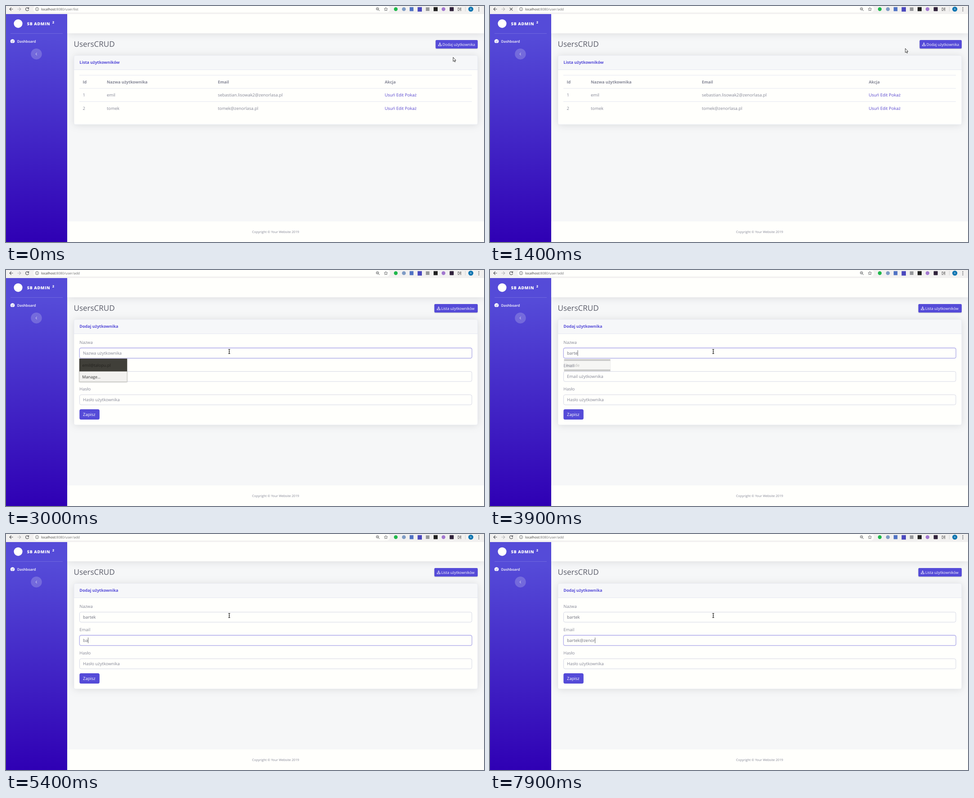
These frames come from a looping animation (1062x527 px, 8 s). An HTML page:

```html
<!DOCTYPE html>
<html lang="pl">
<head>
<meta charset="utf-8">
<title>UsersCRUD</title>
<style>
html, body { margin: 0; width: 100%; height: 100%; overflow: hidden; background: #f6f7f8; }
svg { display: block; width: 1062px; height: 527px; font: 9.45px "Open Sans", "Noto Sans", sans-serif; text-rendering: geometricPrecision; fill: #858796; }
text { white-space: pre; }
.white { fill: #fffffc; }
.line { stroke: #e3e6f0; fill: none; }
.shadow { filter: drop-shadow(0 1.5px 8.5px rgba(58, 59, 69, .15)); }
.primary { fill: #554bd8; }
.title { fill: #554bd8; font-weight: 700; font-size: 9.04px; }
.head { font-weight: 700; font-size: 9.04px; }
.link { fill: #5846cf; }
.small { font-size: 8.25px; }
.url { font-size: 7.6px; }
.popup { font-size: 9px; fill: #333; }
.icon { fill: none; stroke: #505256; stroke-width: 1.2; }
</style>
</head>
<body>
<svg viewBox="0 0 1062 527">
  <defs>
    <linearGradient id="side" x1="0" y1="0" x2="0" y2="1">
      <stop offset=".1" stop-color="#554bd8"/>
      <stop offset="1" stop-color="#2f00b4"/>
    </linearGradient>
    <path id="download" d="M3 0h2v3h2L4 6 1 3h2zM0 5h1.5L4 7.2 6.5 5H8v3H0z" fill="#c3bff2"/>
  </defs>

  <rect width="1062" height="527" fill="#f6f7f8"/>
  <rect class="white shadow" x="136" y="18" width="926" height="43"/>
  <rect class="white" x="136" y="481" width="926" height="46"/>
  <text x="599" y="506.5" text-anchor="middle" font-size="7.2">Copyright © Your Website 2019</text>
  <text x="150.5" y="91" font-size="17" fill="#5a5c69">UsersCRUD</text>

  <g id="list"></g>
  <g id="form"></g>

  <rect y="18" width="136" height="509" fill="url(#side)"/>
  <g class="white">
    <circle cx="27" cy="39.3" r="9.6"/>
    <text x="46.8" y="43" font-size="9.1" font-weight="800" letter-spacing=".6">SB ADMIN</text>
    <text x="103" y="39.2" font-size="7" font-weight="800">2</text>
    <path d="M10 61.5h116" stroke="#fff" stroke-opacity=".16"/>
    <path d="M11.5 82.6a4.8 4.8 0 1 1 6 0z"/>
    <path d="M14.5 81l2-4.5M11.4 79.5h1M12.5 76.8l.6.6" stroke="#554bd8" stroke-width=".9"/>
    <text x="24.8" y="82" font-size="7.9" font-weight="600">Dashboard</text>
    <circle cx="67.5" cy="107.2" r="12.2" fill-opacity=".2"/>
    <path d="M68.7 104.5l-2.5 2.7 2.5 2.7" fill="none" stroke="#fff" stroke-opacity=".6" stroke-width="1.1"/>
  </g>

  <rect width="1062" height="18" fill="#f2f1f0"/>
  <rect class="white" x="61" y="-1" width="792" height="15.5" rx="7.5"/>
  <g class="icon">
    <path d="M15.5 7h-7M11.7 3.4L8.1 7l3.6 3.6"/>
    <path d="M25.5 7h7M29.3 3.4L32.900 7l-3.600 3.600" stroke="#b4b5b7"/>
    <path id="reload" d="M49.800 4.900a3.500 3.500 0 1 0 .700 2.900M50.500 3v2.700h-2.700"/>
    <path id="stop" d="M43.800 3.800l6.400 6.400M50.200 3.800l-6.400 6.400"/>
    <path d="M69 6.500v2.700M69 4.600v1" stroke-width=".9"/>
    <circle cx="69" cy="7" r="3.700" stroke-width=".8"/>
    <circle cx="825.300" cy="6.300" r="2.700" stroke-width="1"/>
    <path d="M827.300 8.300l2.700 2.700M824 6.300h2.600" stroke-width="1"/>
    <path d="M844 3.300l1.100 2.500 2.700.300-2 1.800.600 2.700-2.400-1.400-2.400 1.400.600-2.700-2-1.800 2.700-.300z" stroke-width=".8"/>
    <path d="M1003.500 4.500h3.500m1.500 0h3M1003.500 7.200h1.500m1.500 0h5M1003.500 10h4m1.500 0h2.500" stroke="#333"/>
    <path d="M1020.500 2v10" stroke="#d2d2d2" stroke-width="1"/>
  </g>
  <circle cx="866" cy="7" r="4.200" fill="#20b84c"/>
  <circle cx="884" cy="7" r="4.300" fill="#7f9cc5"/>
  <rect x="896.800" y="2.500" width="8.500" height="9" fill="#4f72c4"/>
  <rect x="914.500" y="2.500" width="9.500" height="10" fill="#4a48bd"/>
  <rect x="932.800" y="3" width="8" height="8" fill="#96989b"/>
  <rect x="950" y="2.500" width="9" height="9" fill="#202020"/>
  <circle cx="972" cy="7" r="4.200" fill="#a278cf"/>
  <rect x="985.700" y="2.500" width="9" height="9" rx="1" fill="#30223b"/>
  <circle cx="1032.700" cy="7" r="5.600" fill="#0b74b0"/>
  <text x="1032.700" y="9.200" text-anchor="middle" font-size="6" fill="#fff">A</text>
  <g fill="#505256"><circle cx="1050.500" cy="3.700" r="1"/><circle cx="1050.500" cy="7.200" r="1"/><circle cx="1050.500" cy="10.700" r="1"/></g>
  <text class="url" x="78" y="9.800"><tspan fill="#333">localhost</tspan><tspan id="path" fill="#707174"></tspan></text>

  <g id="status">
    <path d="M-1 515.500h97q2 0 2 2v11h-99z" fill="#f2f1f0" stroke="#c4c4c4" stroke-width=".8"/>
    <text x="1.800" y="524.300" font-size="8.200" fill="#555">localhost:8080/user/add</text>
  </g>

  <g id="menu" class="popup">
    <rect x="163" y="198" width="106" height="51.500" fill="#f2f1ef" stroke="#b9b8b4" stroke-width=".8" style="filter:drop-shadow(0 1px 1px #0003)"/>
    <rect x="163" y="198" width="106" height="28.500" fill="#403f39"/>
    <text x="169.300" y="215.500" fill="#22211e">emil@talopu.pl</text>
    <text x="169.300" y="241.500">Manage…</text>
  </g>
  <g id="hint" class="popup">
    <rect x="163" y="198" width="106" height="29" fill="#f2f1ef" stroke="#b9b8b4" stroke-width=".8"/>
    <text x="169.300" y="215.500">barsde</text>
  </g>

  <path id="arrow" d="M.4.500v9.300l2.100-1.900 1.500 3.100 1.300-.600-1.400-3h2.700z" fill="#fff" stroke="#222" stroke-width=".9"/>
  <path id="beam" d="M-2-4.700h1.300l.700.500.700-.500H2M0-4.200v8.400M-2 4.700h1.300l.700-.500.700.500H2M-1 0h2" fill="none" stroke="#222" stroke-width="1.200"/>
</svg>

<script>
const $ = id => document.getElementById(id);
const show = (id, on) => $(id).style.display = on ? '' : 'none';
const text = (x, y, s, cls = '') => `<text x="${x}" y="${y}" class="${cls}">${s}</text>`;

const card = (bottom, title) => `
  <rect class="white shadow" x="151" y="110.500" width="897" height="${bottom - 110.5}" rx="3.500"/>
  <path d="M151 142v-28q0-3.500 3.500-3.500h890q3.500 0 3.500 3.500v28z" fill="#f6f7f9"/>
  <path class="line" d="M151 142.300h897"/>
  <rect class="line" x="151" y="110.500" width="897" height="${bottom - 110.5}" rx="3.500" stroke-width=".6"/>
  ${text(163.3, 129, title, 'title')}`;

const button = (x, label, id) => `
  <rect id="${id}" class="primary" x="${x}" y="76" width="${1048 - x}" height="19" rx="2.200" style="filter:drop-shadow(0 1px 1px #0003)"/>
  <use href="#download" x="${x + 5.5}" y="81.500"/>
  ${text(x + 15.3, 88.7, label, 'white small')}`;

const row = (y, cells, cls) => [170.5, 224, 470.7, 841.5]
  .map((x, i) => text(x, y, cells[i], cls || (i == 3 ? 'link' : ''))).join('');

const field = (i, label) => {
  const y = 174 + 52.1 * i;
  return `${text(163.3, y - 9, label)}
  <rect id="glow${i}" x="162.500" y="${y - 1}" width="873.500" height="25" rx="4.500" fill="#d4d1f5"/>
  <rect class="white" x="163.500" y="${y + .4}" width="871.500" height="22.500" rx="3.500" stroke="#d1d3e2" stroke-width=".9"/>
  <rect id="ring${i}" x="163.300" y="${y + .3}" width="872" height="22.600" rx="3.500" fill="none" stroke="#aaa4ec" stroke-width=".9"/>
  <text id="value${i}" x="171" y="${y + 15}"></text>
  <rect id="caret${i}" y="${y + 5.2}" width=".9" height="12.500" fill="#55565f"/>`;
};

const actions = 'Usuń Edit Pokaż';
$('list').innerHTML = card(264.7, 'Lista użytkowników') + button(954.5, 'Dodaj użytkownika', 'add') +
  '<path class="line" d="M163 154.500h872M163 184h872M163 213.500h872"/>' +
  row(173, ['Id', 'Nazwa użytkownika', 'Email', 'Akcja'], 'head') +
  row(202.2, [1, 'emil', 'sebastian.lisowak2@zenorlasa.pl', actions]) +
  row(231.5, [2, 'tomek', 'tomek@zenorlasa.pl', actions]);

$('form').innerHTML = card(346, 'Dodaj użytkownika') + button(951.7, 'Lista użytkowników', 'back') +
  `<g id="ghost"><rect x="164.500" y="199" width="103" height="27.500" fill="#cbcbc9"/>
  <rect x="164.500" y="203" width="103" height="19" fill="#f6f6f4"/>
  <text x="169.300" y="215.500" fill="#c6c6c4" font-weight="600" font-size="9">barsde</text></g>` +
  ['Nazwa', 'Email', 'Hasło'].map((s, i) => field(i, s)).join('') +
  '<rect class="primary" x="163.300" y="311" width="44.500" height="23" rx="3.500"/>' +
  text(171, 326, 'Zapisz', 'white');

const hints = ['Nazwa użytkownika', 'Email użytkownika', 'Hasło użytkownika'];

// [time, length typed so far]
const words = ['bartek', 'bartek@zenor', ''];
const typing = [
  [[3200, 2], [3400, 3], [3700, 4], [3900, 5], [4100, 6]],
  [[4700, 1], [5200, 0], [5300, 1], [5400, 2], [6000, 3], [6200, 4], [6300, 5], [6500, 6],
   [6900, 7], [7400, 8], [7600, 9], [7700, 11], [7900, 12]],
  []
];

// [time, x, y] of the pointer
const moves = [[0, 993, 114], [200, 992.6, 114], [700, 988, 78.5], [900, 988, 78.5], [1000, 987, 78.8],
  [1200, 987, 78.8], [1500, 890, 102], [1900, 714, 137.5], [2000, 640, 164], [2100, 640, 164],
  [2300, 506, 181], [2400, 496, 182]];

const clamp = v => Math.max(0, Math.min(1, v));

function pointer(t) {
  const i = moves.findIndex(m => m[0] > t);
  if (i < 0) return moves.at(-1).slice(1);
  const [a, b] = [moves[i - 1], moves[i]];
  const k = (t - a[0]) / (b[0] - a[0]);
  return [a[1] + (b[1] - a[1]) * k, a[2] + (b[2] - a[2]) * k];
}

function drawField(i, t, focus, caret) {
  const length = typing[i].reduce((n, [at, len]) => t >= at ? len : n, 0);
  const value = $('value' + i);
  const typed = words[i].slice(0, length);
  value.textContent = typed || hints[i];
  value.style.fill = typed ? '#6e707e' : '#858796';
  $('glow' + i).style.opacity = $('ring' + i).style.opacity = focus;
  show('caret' + i, caret);
  if (caret) $('caret' + i).setAttribute('x', 171 + (typed ? value.getComputedTextLength() : 0));
}

function draw(now) {
  const t = Math.floor(now % 8000 / 100) * 100;
  const [x, y] = pointer(t);
  const onForm = t >= 1500;
  const hover = !onForm && y < 95 && y > 76 && x > 954;
  const loading = t >= 1000 && !onForm;

  show('list', !onForm);
  show('form', onForm);
  show('reload', !loading);
  show('stop', loading);
  show('status', t >= 600 && t < 1400);
  $('path').textContent = ':8080/user/' + (t < 1000 ? 'list' : 'add');
  $('add').style.fill = hover ? '#3d1cc6' : '';

  if (onForm) {
    const enter = clamp((t - 2400) / 200), next = clamp((t - 4200) / 200);
    drawField(0, t, enter * (1 - next), t >= 2500 && t < 4300 && (t < 3000 || t >= 3200));
    drawField(1, t, next, t >= 4300);
    drawField(2, t, 0, false);
  }
  show('menu', t >= 2600 && t < 3200);
  show('hint', t >= 3200 && t < 3800);
  show('ghost', t >= 3800 && t < 4100);

  const inField = onForm && y > 174;
  show('arrow', !inField);
  show('beam', inField);
  $(inField ? 'beam' : 'arrow').setAttribute('transform', `translate(${x} ${y})`);
}

function frame() {
  draw(performance.now());
  requestAnimationFrame(frame);
}
frame();
</script>
</body>
</html>
```
